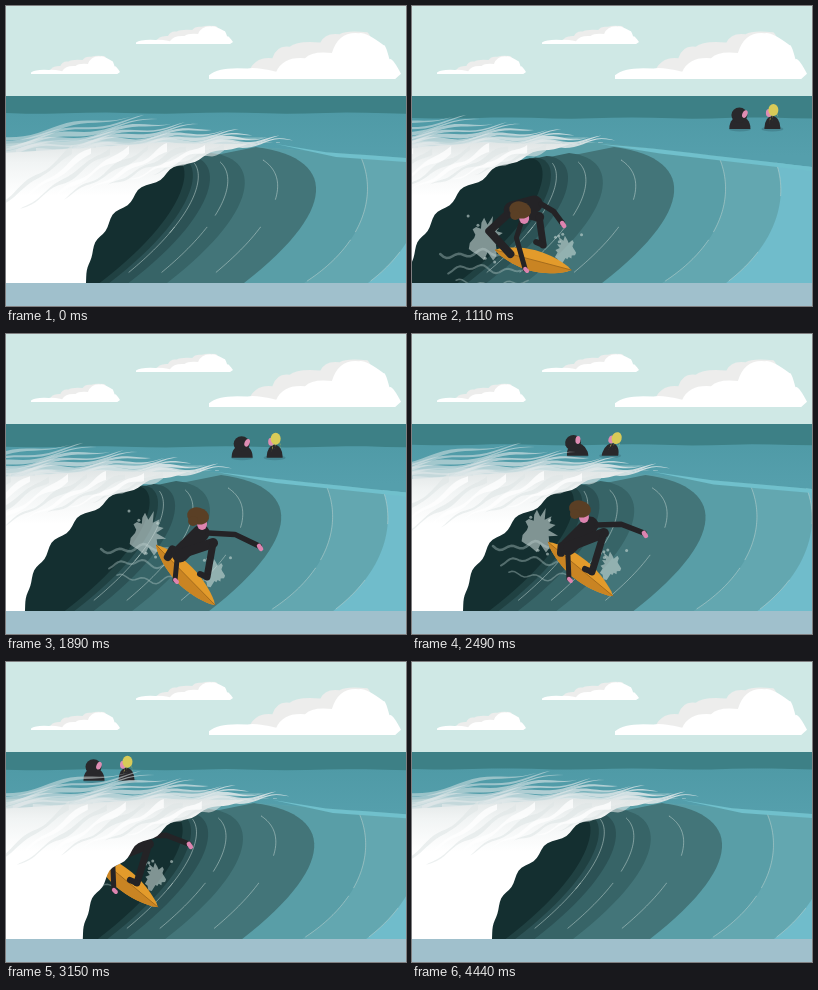
An HTML page with a canvas that plays this animation: 400 by 300 pixels, repeating every 4.47 s.

```html
<!DOCTYPE html>
<html lang="en">
<head>
<meta charset="utf-8">
<title>Barrel wave</title>
<style>
html, body { margin: 0; width: 100%; height: 100%; overflow: hidden; background: #cfe8e5; }
canvas { display: block; width: 100vw; height: 100vh; }
</style>
</head>
<body>
<canvas id="stage"></canvas>
<script>
const LOOP = 4470, W = 400, H = 300, SEA = 277, HORIZON = 90;
const { PI, sin, cos, pow, min, max, abs } = Math;
const canvas = document.getElementById('stage');
const c = canvas.getContext('2d');

const lerp = (a, b, k) => a + (b - a) * k;
const clamp = v => max(0, min(1, v));
const ease = v => .5 - .5 * cos(PI * clamp(v));
const range = (n, f) => Array.from({ length: n }, (_, i) => f(i));
const noise = n => { const v = sin(n * 127.1 + 11.7) * 43758.5453; return v - Math.floor(v); };
const shift = (pts, dx, dy) => pts.map((v, i) => v + (i % 2 ? dy : dx));

// Smooth curve through timed values, flat at both ends
function track(keys, t) {
  const n = keys.length - 1;
  let i = 0;
  while (i < n - 1 && t > keys[i + 1][0]) i++;
  const slope = j => j < 1 || j >= n ? 0
    : (keys[j + 1][1] - keys[j - 1][1]) / (keys[j + 1][0] - keys[j - 1][0]);
  const [t0, a] = keys[i], [t1, b] = keys[i + 1];
  const d = t1 - t0, u = clamp((t - t0) / d), v = 1 - u;
  return a * (1 + 2 * u) * v * v + b * u * u * (3 - 2 * u)
    + d * (slope(i) * u * v * v - slope(i + 1) * u * u * v);
}

function trace(pts) {
  c.beginPath();
  pts.forEach(([x, y]) => c.lineTo(x, y));
}
function fill(pts, color) {
  trace(pts); c.closePath(); c.fillStyle = color; c.fill();
}
function stroke(pts, color, width) {
  trace(pts);
  c.strokeStyle = color; c.lineWidth = width; c.lineCap = c.lineJoin = 'round'; c.stroke();
}
function oval(x, y, rx, ry, color, turn = 0) {
  c.beginPath(); c.ellipse(x, y, rx, ry, turn, 0, 2 * PI); c.fillStyle = color; c.fill();
}
function bezier(p, from = 0, to = 1) {
  return range(31, i => {
    const u = lerp(from, to, i / 30), v = 1 - u;
    const at = k => v * v * v * p[0][k] + 3 * v * v * u * p[1][k] + 3 * v * u * u * p[2][k] + u * u * u * p[3][k];
    return [at(0), at(1)];
  });
}
// Tapered wavy strand from a thick root to a pointed tip
function strand(x0, y0, x1, y1, w, amp, phase, color) {
  const edge = side => range(31, i => {
    const u = i / 30, h = w * pow(1 - u, .7) * (.75 + .25 * sin(u * 11 + phase * 2));
    return [lerp(x0, x1, u), lerp(y0, y1, u) + amp * sin(u * 15 + phase) + side * h];
  });
  fill([...edge(-1), ...edge(1).reverse()], color);
}

// One cloud outline, scaled into each box: puffs rise to the right over a flat base
function puffs(x, y, w, h, knots, color) {
  c.beginPath(); c.moveTo(x + w * knots[0][0], y + h);
  knots.forEach(([kx, ky], i) => {
    const [px, py] = knots[max(0, i - 1)];
    c.quadraticCurveTo(x + w * lerp(px, kx, .25), y + h * (min(py, ky) - .04), x + w * kx, y + h * ky);
  });
  c.lineTo(x + w * knots.at(-1)[0] - w * .03, y + h);
  c.closePath(); c.fillStyle = color; c.fill();
}
const backPuffs = [[.2, .92], [.33, .6], [.42, .38], [.58, .3], [.68, .14], [.82, .1], [.9, .9]];
const frontPuffs = [[0, .93], [.2, .8], [.35, .86], [.5, .6], [.64, .5], [.78, .12], [.91, .35], [.94, .62], [1, .9]];
function cloud(x, y, w, h) {
  puffs(x, y, w, h, backPuffs, '#ededec');
  puffs(x, y, w, h, frontPuffs, '#fff');
}

const swellAt = t => cos(2 * PI * (t - 1650) / LOOP);

// Waiting surfers, bobbing past
function floater(x, y, turn, blonde) {
  const suit = '#29282b', skin = '#df8db3';
  c.save();
  c.translate(x, y);
  oval(0, 1, 11, 2.5, 'rgba(50,95,105,.35)');
  c.beginPath(); c.rect(-25, -40, 50, 41); c.clip();
  c.rotate(turn);
  oval(0, 0, blonde ? 8 : 10.5, 12, suit);
  if (blonde) {
    oval(-3.5, -15, 3, 4, skin);
    oval(1, -18, 5, 6, '#d8cb58');
    range(4, i => strand(i * 2 - 1, -16, i * 3 - 3, -5 - i % 2 * 3, 2, 1, i, '#d8cb58'));
  } else {
    oval(-.5, -13, 8, 7.5, suit);
    oval(5, -14, 2.5, 4, skin, .4);
  }
  c.restore();
}
function floaters(t) {
  const x = 328 - .1176 * (t - 1110), y = 119.5 + 3.5 * swellAt(t);
  const lean = .32 * ease(1 - abs(t - 2490) / 620);
  floater(x, y, -lean, false);
  floater(x + 32.5, y, lean, true);
}

// 0 is the closed barrel, 1 the widest one
const opening = t => t < 1050 ? ease(t / 1050) : 1 - ease((t - 1050) / 2400);

// Edge of a shadow band; each higher k sits deeper in the barrel
function band(k) {
  const q = pow(.5, k), top = 160 + 90 * q, low = 84 + 154 * q;
  const mid = (top + low) / 2, bulge = mid + (165 + 145 * q - mid) * 4 / 3;
  return [[top, 153 - 12 * q], [bulge, 152], [bulge, 204], [low, SEA]];
}
const swell = (x, low) => [[x - 8, 140], [x + 20, 185], [x, 240], [low, SEA]];

function face(s) {
  const top = x => lerp(136, 152, clamp((x - 180) / 220)) + s * 9 * clamp((x - 190) / 210);
  const surface = range(21, i => [i * 20, top(i * 20)]);
  const ridge = (p, from, to) => stroke(bezier(p, from, to), 'rgba(190,210,206,.55)', 1);
  const crest = swell(357, 298), shoulder = swell(412, 362);
  c.save();
  fill([...surface, [W, SEA], [0, SEA]], '#63a7b0');
  trace([...surface, [W, SEA], [0, SEA]]); c.clip();
  c.translate(-48 * s, 0);
  fill([...bezier(crest), [0, SEA], [0, 130]], '#599ea7');
  fill([...bezier(shoulder), [W + 60, SEA], [W + 60, 130]], '#70bccb');
  range(5, k => {
    const tone = [67, 117, 121].map((v, i) => Math.round(lerp(v, [20, 47, 48][i], k / 4)));
    fill([...bezier(band(k)), [-120, SEA], [-120, 215]], `rgb(${tone})`);
  });
  ridge(crest, .08, .6); ridge(crest, .66, .98);
  ridge(shoulder, .05, .35); ridge(shoulder, .75, .98);
  [.45, 1.4, 2.6].forEach((k, i) => { ridge(band(k), .2, .55 + i * .1); ridge(band(k), .72, .95); });
  c.restore();
  const lip = 270 - 82 * s;
  fill([[lip, 138], ...surface.filter(([x]) => x > lip + 40), [W, top(W) + 4], [lip + 60, top(lip + 60) + 4]], '#70c0cc');
}

// The falling curtain ends in a scalloped superellipse
function curtainEdge() {
  return range(61, i => {
    const a = PI / 2 * (1 - i / 60), r = 2 / 1.85;
    const ripple = 1.8 * sin(i * .75) * sin(PI * i / 60);
    return [80 + 195 * (1 - pow(max(0, cos(a)), r)) + ripple, SEA - 141 * pow(max(0, sin(a)), r) + ripple];
  });
}
function foam(s) {
  c.save();
  c.translate(-84 * s, 0);
  strand(0, 146, 262, 130, 11, 1.5, 0, 'rgba(215,229,231,.4)');
  range(13, i => strand(-90 + 20 * i, 150 - .5 * i, 125 + 13.5 * i, 109 + 2.1 * i, 4.5, 2.6, i * 1.9,
    `rgba(226,233,234,${.5 + .03 * i})`));
  const g = c.createLinearGradient(0, 134, 0, 190);
  g.addColorStop(0, '#dfe4e4');
  g.addColorStop(.4, '#f1f4f4');
  g.addColorStop(1, '#fff');
  fill([...curtainEdge(), [-20, SEA], [-20, 148], [80, 142], [150, 137], [230, 138]], g);
  range(9, i => strand(218 - 19 * i, 141 + i * .5, 146 - 22 * i, 168 + 6 * i, 4.5, 1.6, i * 1.3,
    i % 2 ? 'rgba(255,255,255,.75)' : 'rgba(224,230,231,.6)'));
  c.restore();
}

// Rider poses: the joints below as x,y pairs
const joints = ['tail', 'nose', 'head', 'neck', 'hip', 'handR', 'handL', 'knee', 'foot'];
const crouch = [83, 244, 159, 264, 108, 205, 122, 198, 100, 204, 150, 217, 113, 263, 127, 211, 131, 239];
const reach = [150, 211, 209, 271, 192, 183, 195, 199, 174, 220, 253, 212, 169, 246, 207, 209, 201, 243];
const carve = [136, 208, 201, 262, 168, 176, 178, 191, 156, 213, 232, 199, 157, 245, 192, 199, 180, 238];
const ride = [
  [450, shift(crouch, -170, 0)], [1110, crouch], [1890, reach], [2490, carve],
  [3150, shift(carve, -49, -17)], [3700, shift(carve, -150, -22)]
];

const add = (p, x, y) => [p[0] + x, p[1] + y];
const between = (a, b, k) => [lerp(a[0], b[0], k), lerp(a[1], b[1], k)];
// Middle joint, pushed sideways off the straight line
const bend = (a, b, k) => add(between(a, b, .5), (a[1] - b[1]) * k, (b[0] - a[0]) * k);

function splash(x, y, rx, ry, seed) {
  const mist = 'rgba(200,216,214,.6)';
  fill(range(26, i => {
    const a = i / 26 * 2 * PI, r = .45 + .65 * noise(i + seed);
    return [x + rx * r * cos(a), y + ry * r * sin(a)];
  }), mist);
  range(5, i => oval(x + rx * 2.4 * (noise(seed + i * 3) - .5), y + ry * 2.4 * (noise(seed + i * 7) - .5), 1.5, 1.5, mist));
}
function surfboard(tail, nose) {
  const side = k => range(21, i => {
    const u = i / 20, h = k * pow(sin(PI * u), .75) / Math.hypot(nose[0] - tail[0], nose[1] - tail[1]);
    return add(between(tail, nose, u), (nose[1] - tail[1]) * h, (tail[0] - nose[0]) * h);
  });
  fill([...side(10), ...side(-11).reverse()], '#e39b2b');
  fill([...side(0), ...side(-11).reverse()], '#c98423');
  stroke([tail, nose], '#a56c1c', 1);
}
function rider(t) {
  const p = crouch.map((_, i) => track(ride.map(([at, pose]) => [at, pose[i]]), t));
  const j = {};
  joints.forEach((name, i) => { j[name] = [p[2 * i], p[2 * i + 1]]; });
  const { tail, nose, head, neck, hip, handR, handL, knee, foot } = j;
  const suit = '#242326', skin = '#dd84b0', hair = '#5a3f25';
  const shR = add(neck, 7, 0), shL = add(neck, -8, 3);
  const backFoot = between(tail, nose, .2), mid = between(tail, nose, .7);

  range(3, i => stroke(range(25, n => [tail[0] - 55 + n * 3 + i * 8,
    tail[1] + 4 + i * 15 + 5 * sin(n * .55 + i * 2) * cos(n * .23)]), 'rgba(180,202,200,.4)', 2.5 - i * .5));
  splash(tail[0] - 9, tail[1] - 12, 18, 22, 3);
  splash(mid[0] + 18, mid[1] - 14, 13, 15, 40);
  surfboard(tail, nose);

  stroke([hip, bend(hip, backFoot, .5), backFoot], suit, 8);
  stroke([shL, bend(shL, handL, .15), handL], suit, 5);
  stroke([hip, neck], suit, 17);
  stroke([hip, knee], suit, 10);
  stroke([knee, foot], suit, 7);
  stroke([foot, add(foot, -7, -3)], suit, 6);
  stroke([shR, bend(shR, handR, -.1), handR], suit, 5.5);
  stroke([handR, add(handR, 2, 3)], skin, 4.5);
  stroke([handL, add(handL, 2, 2)], skin, 4);
  oval(head[0] + 4, head[1] + 7, 5, 6, skin);
  oval(head[0], head[1] - 1, 11, 8.5, hair, .2);
  oval(head[0] - 5, head[1] + 4, 5, 5, hair);
}

function draw(t) {
  const s = opening(t), swing = swellAt(t);
  c.fillStyle = '#cfe8e5'; c.fillRect(0, 0, W, HORIZON + 1);
  cloud(25, 48, 89, 20);
  cloud(130, 18, 97, 20);
  cloud(203, 21, 192, 52);
  const sea = c.createLinearGradient(0, 105, 0, 150);
  sea.addColorStop(0, '#4f9aa6');
  sea.addColorStop(1, '#559fac');
  c.fillStyle = sea; c.fillRect(0, HORIZON, W, 190);
  fill([[0, HORIZON], ...range(21, i => [i * 20, 109.5 + 3.5 * swing + .6 * sin(i)]), [W, HORIZON]], '#3d8086');
  floaters(t);
  face(s);
  if (t > 450 && t < 3700) rider(t);
  foam(s);
  c.fillStyle = '#a0c0cc'; c.fillRect(0, SEA, W, H - SEA);
}

function frame(now) {
  const w = Math.round(innerWidth * devicePixelRatio), h = Math.round(innerHeight * devicePixelRatio);
  if (canvas.width !== w || canvas.height !== h) { canvas.width = w; canvas.height = h; }
  c.setTransform(w / W, 0, 0, h / H, 0, 0);
  draw(now % LOOP);
  requestAnimationFrame(frame);
}
requestAnimationFrame(frame);
</script>
</body>
</html>
```
